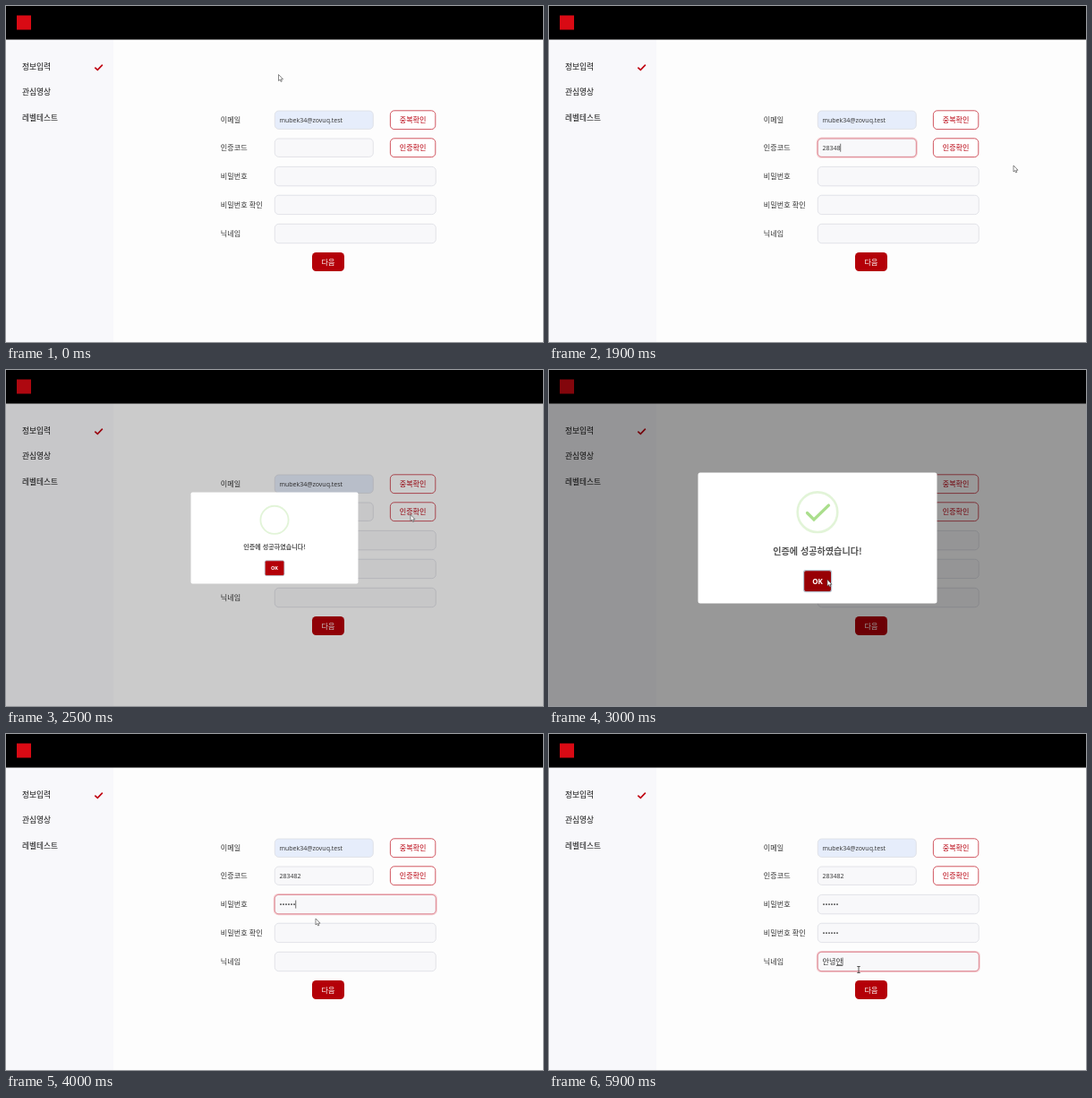
Recreate the animation shown at these times as an HTML page. Size 600 px wide and 375 px high, loop 6100 ms.

```html
<!DOCTYPE html>
<html lang="ko">
<head>
<meta charset="utf-8">
<style>
  html, body { margin: 0; width: 100%; height: 100%; overflow: hidden; }
  svg { display: block; width: 100vw; height: 100vh; }
  text { font: 8.1px "Noto Sans CJK KR", "Noto Sans CJK", "Noto Sans CJK JP", sans-serif; fill: #333; }
  .menu text { font-size: 8.7px; font-weight: 500; fill: #111; }
  .latin { font: 7px "Open Sans", sans-serif; }
  .dots { font: 8px "Open Sans", sans-serif; }
  .mid { text-anchor: middle; }
  .ring { fill: none; stroke: #dc3545; }
</style>
</head>
<body>
<svg viewBox="0 0 600 375">
  <rect width="600" height="375" fill="#fdfdfd"/>
  <rect y="37" width="120" height="338" fill="#f8f8fb"/>
  <rect width="600" height="37.5"/>
  <rect x="12" y="10.5" width="16" height="16" fill="#d90a14"/>
  <g class="menu">
    <text x="18" y="70.6">정보입력</text>
    <text x="18" y="99.2">관심영상</text>
    <text x="18" y="128.2">레벨테스트</text>
  </g>
  <path d="M99.3 68.6L102.3 71.4L107.8 65.6" fill="none" stroke="#c0000f" stroke-width="1.6"/>
  <g id="form"></g>
  <rect id="shade" width="600" height="375"/>
  <g id="modal">
    <rect x="166.5" y="114.5" width="267" height="146" rx="2.5" fill="#fff"/>
    <circle cx="300" cy="158.7" r="22.3" fill="none" stroke="#a5dc86" stroke-opacity=".32" stroke-width="2.6"/>
    <path id="tick" d="M288.5 159.5L296 167L312.5 151" pathLength="1" fill="none" stroke="#a5dc86" stroke-opacity=".95" stroke-width="3.2" stroke-linecap="round"/>
    <text class="mid" x="300" y="205.8" style="font-size:10.1px;font-weight:600;fill:#545454">인증에 성공하였습니다!</text>
    <rect id="ok" x="284.6" y="223.6" width="31" height="24" rx="2.5" stroke="#b9c4d0" stroke-width="1.2"/>
    <text class="mid" x="300" y="238.7" style="font:700 8px 'Open Sans',sans-serif;fill:#fff">OK</text>
  </g>
  <g id="pointer">
    <path id="arrow" d="M0 0V7L1.6 5.6L2.7 8L3.8 7.5L2.8 5.2H5Z" fill="#fff" stroke="#555" stroke-width=".7"/>
    <path id="beam" d="M-1.7-3.5H1.7M0-3.5V3.5M-1.7 3.5H1.7" fill="none" stroke="#444" stroke-width=".9"/>
  </g>
</svg>
<script>
const $ = id => document.getElementById(id);
const clamp = v => Math.min(1, Math.max(0, v));
const LOOP = 6100, STEP = 100, OPEN = 2500, CLOSE = 3100;

const typed = (text, start, pace) => t =>
  text.slice(0, Math.max(0, Math.floor((t - start) / pace) + 1));
const syllables = ['ㅇ', '아', '안', '안', '안ㄴ', '안녀', '안녕', '안녕ㅇ', '안녕아', '안녕안'];
const nickname = t => t < 5000 ? '' : syllables[Math.min(9, Math.floor((t - 5000) / 100))];

// focus: [from, to] in ms
const fields = [
  { label: '이메일', y: 117, w: 110, h: 20.4, font: 'latin', button: '중복확인', fill: '#e6edfb',
    value: () => 'mubek34@zovuq.test', focus: [0, 0] },
  { label: '인증코드', y: 148, w: 110, h: 20.4, font: 'latin', button: '인증확인',
    value: typed('283482', 1500, 100), focus: [1200, 2300] },
  { label: '비밀번호', y: 179.4, w: 180, h: 21.4, font: 'dots',
    value: typed('••••••', 3600, 80), focus: [3400, 4100] },
  { label: '비밀번호 확인', y: 211.2, w: 180, h: 21.4, font: 'dots',
    value: typed('••••••', 4200, 70), focus: [4100, 4600] },
  { label: '닉네임', y: 243.3, w: 180, h: 21.4, font: '',
    value: nickname, focus: [4600, LOOP], compose: true },
];

const box = (x, y, w, h, attrs) =>
  `<rect x="${x}" y="${y}" width="${w}" height="${h}" rx="4.5" ${attrs}/>`;

$('form').innerHTML = fields.map(({ label, y, w, h, font, button, fill = '#f8f8fa' }, i) => {
  const base = y + h / 2 + 3;
  return `<text x="239.8" y="${base}">${label}</text>`
    + box(300.3, y, w, h, `fill="${fill}" stroke="#dcdee4" stroke-width=".8"`)
    + `<g id="ring${i}">`
    + box(299.8, y - .4, w + 1, h + .8, 'class="ring" stroke-width="2" stroke-opacity=".25"')
    + box(300.2, y, w + .2, h, 'class="ring" stroke-width=".9" stroke-opacity=".35"') + '</g>'
    + `<text id="value${i}" class="${font}" x="305.5" y="${font ? base - .2 : base}"></text>`
    + `<path id="caret${i}" stroke="#333" stroke-width=".7" fill="none"/>`
    + (button ? box(429.4, y - .2, 50.4, 20.8, 'fill="#fff" stroke="#cc4450" stroke-width=".9"')
      + `<text class="mid" x="454.6" y="${base}" style="fill:#b8000f">${button}</text>` : '');
}).join('')
  + box(342, 275, 36, 21, 'fill="#b40008"')
  + '<text class="mid" x="360" y="288.6" style="fill:#fff">다음</text>';

// Interpolates rows of [time, ...values]
function track(rows, t, ease = u => u) {
  const n = rows.findIndex(row => row[0] > t);
  if (n < 0) return rows[rows.length - 1].slice(1);
  if (n === 0) return rows[0].slice(1);
  const a = rows[n - 1], b = rows[n], u = ease((t - a[0]) / (b[0] - a[0]));
  return a.slice(1).map((v, i) => v + (b[i + 1] - v) * u);
}
const smooth = u => u * u * (3 - 2 * u);

const route = [
  [0, 304.5, 76.5], [400, 594, 190], [700, 440, 282], [800, 425, 276], [1200, 387, 161],
  [1600, 387, 161], [1900, 519, 178], [2000, 519, 178], [2300, 452, 161.5], [2500, 452, 161.5],
  [2900, 311, 234], [3100, 311, 234], [3400, 346, 190], [3900, 346, 190], [4100, 346, 222],
  [4300, 346, 222], [4600, 346, 263],
];
const pop = [[0, .7], [135, 1.05], [240, .95], [300, 1]];

function drawField(field, i, t) {
  const value = field.value(t), [from, to] = field.focus;
  const focused = t >= from && t < to;
  const text = $('value' + i);
  text.textContent = value;
  $('ring' + i).style.opacity = focused ? clamp((t - from + 100) / 150) : 0;
  const end = 305.7 + (value ? text.getComputedTextLength() : 0);
  const mid = field.y + field.h / 2;
  let d = '';
  if (focused && (value || field.compose)) {
    d = `M${end} ${mid - 4.5}V${mid + 4.5}`;
    if (field.compose && value) d += `H${end - 7.2}`;
  }
  $('caret' + i).setAttribute('d', d);
}

function draw(t) {
  fields.forEach((field, i) => drawField(field, i, t));

  const open = t >= OPEN && t < CLOSE, age = t - OPEN;
  const [scale] = track(pop, age);
  $('shade').style.opacity = open ? .4 * clamp((age + 50) / 100) : 0;
  $('modal').style.display = open ? '' : 'none';
  $('modal').setAttribute('transform', `translate(300 187.5) scale(${scale}) translate(-300 -187.5)`);
  const drawn = smooth(clamp((age - 100) / 350));
  $('tick').style.strokeDasharray = `${drawn} 2`;
  $('tick').style.opacity = drawn > 0 ? 1 : 0;
  $('ok').style.fill = t >= 2900 ? '#980005' : '#b40008';

  const [x, y] = track(route, t, smooth);
  const typing = !open && fields.some(f => x > 300 && x < 300 + f.w && y > f.y && y < f.y + f.h);
  $('pointer').setAttribute('transform', `translate(${x} ${y})`);
  $('arrow').style.display = typing ? 'none' : '';
  $('beam').style.display = typing ? '' : 'none';
}

const begin = performance.now();
function tick() {
  const t = (performance.now() - begin) % LOOP;
  draw(Math.floor(t / STEP) * STEP);
  requestAnimationFrame(tick);
}
tick();
</script>
</body>
</html>
```
